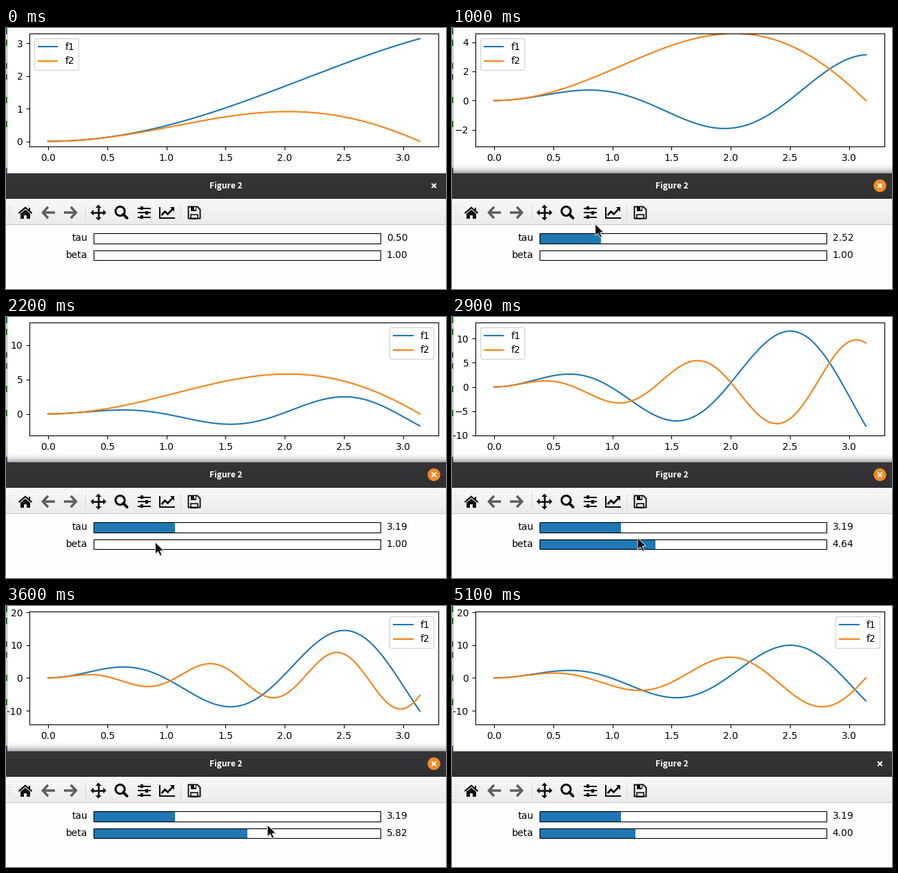
A matplotlib script for the animation above (5300 ms loop, 638 px wide and 379 px high).

```python
import numpy as np
import matplotlib.pyplot as plt
from matplotlib.animation import FuncAnimation
from matplotlib.patches import Circle, Polygon, Rectangle

W, H, DPI = 638, 379, 100
STEP, FRAMES = 100, 53
BLUE, ORANGE, INK, GREY = "#1f77b4", "#f58216", "#0c0c0c", "#5e5d5f"

plt.rcParams["toolbar"] = "None"
plt.rcParams["font.family"] = "DejaVu Sans"


# ---- motion ----

def smooth(u):
    return u * u * (3 - 2 * u)


def ease_out(u):
    return 1 - (1 - u) ** 1.75


def glide(t, t0, t1, ease):
    return ease(np.clip((t - t0) / (t1 - t0), 0, 1))


def tau_at(t):
    return (0.5 + 6.81 * glide(t, 661, 1600, smooth)
            - 4.123 * glide(t, 1600, 2200, smooth))


def beta_at(t):
    return (1 + 7.145 * glide(t, 2669, 3360, ease_out)
            - 4.145 * glide(t, 3360, 4000, ease_out))


# pointer stops: time, place, easing on the way there
STOPS = [(300, (187, 369), smooth), (680, (129, 289), smooth),
         (1620, (424, 276), smooth), (2200, (217, 328), smooth),
         (2690, (129, 324), smooth), (3460, (458, 318), ease_out),
         (4000, (266, 320), ease_out), (4200, (266, 320), smooth),
         (4800, (71, 3), smooth)]


def pointer_at(t):
    place = np.array(STOPS[0][1], float)
    for (t0, a, _), (t1, b, ease) in zip(STOPS, STOPS[1:]):
        place += np.subtract(b, a) * glide(t, t0, t1, ease)
    return place


x = np.linspace(0, np.pi, 200)


def curves(t):
    tau, beta = tau_at(t), beta_at(t)
    return beta * x * np.sin(tau * x), tau * x * np.sin(beta * x)


# The y range only grows; slider events come faster than frames
fine = np.array([curves(t) for t in range(0, FRAMES * STEP, 10)])
lows = np.minimum.accumulate(np.minimum(fine.min((1, 2)), -0.05 * np.pi))
highs = np.maximum.accumulate(np.maximum(fine.max((1, 2)), 1.05 * np.pi))


# ---- plot ----

fig = plt.figure(figsize=(W / DPI, H / DPI), dpi=DPI, facecolor="white")

ax = fig.add_axes([34 / W, 207 / H, 593 / W, 164 / H])
line1, = ax.plot(x, 0 * x, label="f1", color=BLUE)
line2, = ax.plot(x, 0 * x, label="f2", color=ORANGE)
ax.set_xlim(-0.05 * np.pi, 1.05 * np.pi)
ax.legend(loc="best")

# Overlay in pixel coordinates, origin at the top left
ui = fig.add_axes([0, 0, 1, 1], zorder=2)
ui.axis("off")


def px(width):
    return width * 72 / DPI


def rect(x0, y0, x1, y1, color, **kw):
    kw = {"lw": 0, **kw}
    return ui.add_patch(Rectangle((x0, y0), x1 - x0, y1 - y0, fc=color, **kw))


def box(cx, cy, rx, ry, color=INK, **kw):
    return rect(cx - rx, cy - ry, cx + rx, cy + ry, color, **kw)


def stroke(points, width, color=INK, **kw):
    kw = {"solid_capstyle": "butt", "solid_joinstyle": "miter", **kw}
    return ui.plot(*zip(*points), color=color, lw=px(width), **kw)[0]


def shape(points, color=INK, **kw):
    kw = {"lw": 0, **kw}
    return ui.add_patch(Polygon(points, closed=True, fc=color, **kw))


def gradient(y0, y1, top, bottom):
    mix = np.linspace(0, 1, y1 - y0)[:, None, None]
    img = np.array(top) * (1 - mix) + np.array(bottom) * mix
    ui.imshow(img / 255, extent=(0, W, y1, y0), aspect="auto",
              interpolation="nearest", zorder=0.5)


def draw_window():
    # sliver of the window behind
    rect(0, 0, 1, 211, "#f4f4f4")
    rect(1, 0, 2, 211, "#a5a5a5")
    for y in (0, 17, 100, 135):
        rect(0, y, 1.5, y + 9, "#27722c")
    for y in (51, 67, 203):
        rect(0, y, 1.5, y + 8, "#5b5870")

    gradient(211, 248, (54, 52, 55), (49, 48, 51))
    gradient(248, 286, (250, 247, 251), (235, 234, 236))
    rect(0, 247, W, 248, "#252427")
    rect(0, 285, W, 286, "#c9c8ca")
    rect(0, 286, W, H, "#fefefe")
    ui.text(318.5, 229.5, "Figure 2", color="white", ha="center",
            va="center", size=px(12), weight="bold",
            family="Noto Sans CJK JP")


def draw_arrow(cx, way):
    tip = cx + way * 8
    stroke([(tip - way * 7.5, 259.8), (tip, 268),
            (tip - way * 7.5, 276.2)], 3.5, GREY)
    stroke([(cx - way * 9.5, 268), (tip, 268)], 3.5, GREY)


def draw_toolbar():
    for gx in (4, 7):
        for gy in range(259, 279, 4):
            rect(gx, gy, gx + 1, gy + 1, "#bdbcbe")
    for sx in (115, 253):
        rect(sx, 257, sx + 1, 279, "#d6d5d7")

    # home
    stroke([(18.5, 269), (28, 260.8), (37.5, 269)], 2.2)
    rect(32.5, 260.5, 35, 266, INK)
    shape([(21, 277), (21, 269.7), (28, 263.8), (35, 269.7), (35, 277)])
    rect(26, 271.5, 30, 277, "#eeedef")

    draw_arrow(61.5, -1)
    draw_arrow(93.5, 1)

    # pan
    centre = np.array([134, 268])
    for angle in np.arange(4) * np.pi / 2:
        out = np.array([np.cos(angle), np.sin(angle)])
        side = out[::-1] * (-1, 1) * 4.3
        stroke([centre, centre + 8 * out], 2.6)
        shape([centre + 11.5 * out, centre + 7 * out + side,
               centre + 7 * out - side])

    # zoom
    ui.add_patch(Circle((165.5, 266), 6.6, fill=False, ec=INK, lw=px(3)))
    stroke([(170, 270.5), (175.5, 276)], 4, solid_capstyle="round")

    # subplot settings
    for row in (-1, 0, 1):
        y = 268 + 6.5 * row
        stroke([(190.5, y), (209.5, y)], 2)
        box(204 - 7 * abs(row), y, 2, 2.5)

    # line chart
    stroke([(222.5, 259.5), (222.5, 276), (245, 276)], 2)
    stroke([(225.5, 272), (230.5, 266.5), (234.5, 270.3), (241.5, 263)], 2.7)
    shape([(237.5, 260), (244, 260), (244, 266.5)])

    # save
    shape([(264.5, 259.5), (277.5, 259.5), (281.5, 263.5), (281.5, 276.5),
           (264.5, 276.5)], "none", ec=INK, lw=px(1.9))
    box(272, 262.5, 4, 3)
    box(273.5, 262.2, 1, 1.8, "#f0eff1")
    box(273, 273.5, 5, 3, "none", ec=INK, lw=px(1.6))


class Slider:
    LEFT, RIGHT, HALF = 127, 543, 7.4

    def __init__(self, name, mid, vmin, vmax):
        self.vmin = vmin
        self.scale = (self.RIGHT - self.LEFT) / (vmax - vmin)
        top, bottom = mid - self.HALF, mid + self.HALF
        self.bar = rect(self.LEFT, top, self.LEFT, bottom, BLUE)
        rect(self.LEFT, top, self.RIGHT, bottom, "none",
             ec="black", lw=0.8, zorder=3)
        ui.text(118.7, mid, name, ha="right", va="center", size=10)
        self.label = ui.text(551.8, mid, "", ha="left", va="center", size=10)

    def set(self, value):
        self.bar.set_width((value - self.vmin) * self.scale)
        self.label.set_text(f"{value:.2f}")


draw_window()
draw_toolbar()
tau_slider = Slider("tau", 305.2, 0.5, 10)
beta_slider = Slider("beta", 330, 1, 10)

shadow = [rect(0, 210 - d, W, 211 - d, "black",
               alpha=0.35 * (1 - d / 16) ** 2.5) for d in range(16)]
button = ui.add_patch(Circle((620.5, 229), 9.2, fc="#f08c28", lw=0))
for s in (-1, 1):
    stroke([(617.3, 229 - 3.2 * s), (623.7, 229 + 3.2 * s)], 2, "white")

ARROW = np.array([(0, 0), (0, 17), (4, 13.5), (6.8, 19.5),
                  (9.5, 18.4), (6.8, 12.5), (12, 12)])
halo = shape(ARROW, "#777777", alpha=0.35, zorder=8)
pointer = shape(ARROW, "#111111", ec="#f4f4f4", lw=px(0.8), zorder=9)

ui.set_xlim(0, W)
ui.set_ylim(H, 0)


def update(i):
    t = i * STEP
    for line, y in zip((line1, line2), curves(t)):
        line.set_ydata(y)
    ax.set_ylim(lows[t // 10], highs[t // 10])
    tau_slider.set(tau_at(t))
    beta_slider.set(beta_at(t))

    button.set_visible(800 <= t < 4800)
    for band in shadow:
        band.set_visible(800 <= t < 5100)

    tip = pointer_at(t) - (0.5, 1)
    pointer.set_xy(ARROW + tip)
    halo.set_xy(ARROW + tip + 1.2)
    for part in (pointer, halo):
        part.set_visible(200 <= t < 4900)
    return []


anim = FuncAnimation(fig, update, frames=FRAMES, interval=STEP,
                     repeat=True, repeat_delay=0, blit=False)
plt.show()
```
